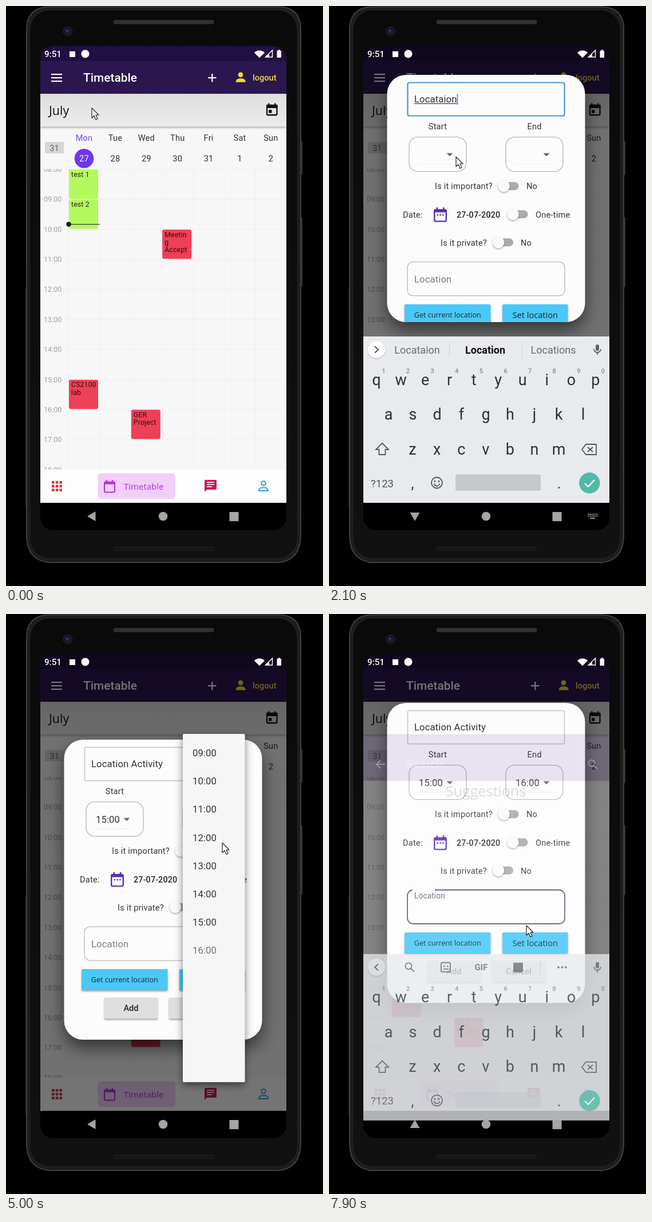
These frames come from a looping animation (554 by 1011 pixels, 8 s). An HTML page with a canvas:

```html
<!DOCTYPE html>
<html lang="en">
<head>
<meta charset="utf-8">
<title>Timetable</title>
<style>
html, body { margin: 0; width: 100%; height: 100%; overflow: hidden; background: #000; }
canvas { display: block; }
</style>
</head>
<body>
<canvas id="stage" width="554" height="1011"></canvas>
<script>
const ctx = document.getElementById('stage').getContext('2d');
const LOOP = 8000, STEP = 100, HOUR = 52.35, DAY = 54.4, ROW = 49.2;
const ROBOTO = 'Roboto, sans-serif', OPEN = '"Open Sans", sans-serif';

// Keyframes: [time, value, ...]
const CURSOR = [[0,150,178],[100,190,166],[300,345,128],[600,352,126],[800,346,150],[1000,272,252],
  [1800,270,254],[2100,222,263],[3500,212,261],[3900,205,275],[4300,178,582],[4500,178,587],
  [4700,372,356],[4800,376,362],[5000,378,399],[5400,352,580],[5700,350,584],[6100,347,552],
  [6500,272,476],[7200,274,478],[7500,345,543]];
const BOARD = [[1000,0],[1100,.4],[1200,.85],[1300,.96],[1400,1],[3500,1],[3600,.7],[3700,0],
  [5900,0],[6000,.6],[6100,.96],[6200,1],[7800,1],[7900,.76]];
const VIEW = [[1000,866],[1200,576],[3500,576],[3600,738],[3700,866],[5900,866],[6000,660],
  [6100,576],[7800,576],[7900,738]];
const FLOAT = [[6600,0],[6700,.6],[6800,1],[7800,1],[7900,.65]];

const clamp = v => Math.max(0, Math.min(1, v));
const ease = v => v * v * (3 - 2 * v);

function track(keys, t, i = 1) {
  if (t <= keys[0][0]) return keys[0][i];
  for (let n = 1; n < keys.length; n++) {
    const a = keys[n - 1], b = keys[n];
    if (t < b[0]) return a[i] + (b[i] - a[i]) * (t - a[0]) / (b[0] - a[0]);
  }
  return keys[keys.length - 1][i];
}

function text(s, x, y, size, color, { align = 'left', weight = 400, font = ROBOTO, space = 0 } = {}) {
  ctx.font = `${weight} ${size}px ${font}`;
  ctx.letterSpacing = space + 'px';
  ctx.textAlign = align;
  ctx.fillStyle = color;
  ctx.fillText(s, x, y + size * .355);
}
function rect(x, y, w, h, color) {
  ctx.fillStyle = color;
  ctx.fillRect(x, y, w, h);
}
function box(x, y, w, h, r, fill, stroke, line = 1) {
  ctx.beginPath();
  ctx.roundRect(x, y, w, h, r);
  if (fill) { ctx.fillStyle = fill; ctx.fill(); }
  if (stroke) { ctx.strokeStyle = stroke; ctx.lineWidth = line; ctx.stroke(); }
}
function disc(x, y, r, fill, stroke, line = 1) {
  ctx.beginPath();
  ctx.arc(x, y, r, 0, 7);
  if (fill) { ctx.fillStyle = fill; ctx.fill(); }
  if (stroke) { ctx.strokeStyle = stroke; ctx.lineWidth = line; ctx.stroke(); }
}
function poly(pts, fill, stroke, line = 2, open = false) {
  ctx.beginPath();
  pts.forEach(([x, y]) => ctx.lineTo(x, y));
  if (!open) ctx.closePath();
  if (fill) { ctx.fillStyle = fill; ctx.fill(); }
  if (stroke) { ctx.strokeStyle = stroke; ctx.lineWidth = line; ctx.stroke(); }
}
function shadowed(blur, dy, alpha, draw) {
  ctx.save();
  ctx.shadowColor = `rgba(0,0,0,${alpha})`;
  ctx.shadowBlur = blur;
  ctx.shadowOffsetY = dy;
  draw();
  ctx.restore();
}
function vertical(y0, y1, c0, c1) {
  const g = ctx.createLinearGradient(0, y0, 0, y1);
  g.addColorStop(0, c0);
  g.addColorStop(1, c1);
  return g;
}
function clipBox(x, y, w, h, r) {
  ctx.beginPath();
  ctx.roundRect(x, y, w, h, r);
  ctx.clip();
}

function calendarIcon(x, y, color, s = 1) {
  box(x - 9.5 * s, y - 8 * s, 19 * s, 18.5 * s, 2, null, color, 2.2 * s);
  rect(x - 9.5 * s, y - 9 * s, 19 * s, 5 * s, color);
  rect(x - 6.5 * s, y - 12 * s, 2.4 * s, 4 * s, color);
  rect(x + 4.1 * s, y - 12 * s, 2.4 * s, 4 * s, color);
}
function magnifier(x, y, color) {
  disc(x - 2, y - 2, 5.5, null, color, 2);
  poly([[x + 2, y + 2], [x + 8, y + 8]], null, color, 2.2, true);
}

function phone() {
  rect(0, 0, 554, 1011, '#000');
  box(514, 235, 4, 60, 2, '#333');
  box(514, 368, 4, 122, 2, '#333');
  rect(34, 490, 2, 385, '#222');
  const shell = new Path2D('M72 1.5 H480 Q515 4 515 40 V926 Q513 967 476 970 H76 Q38 967 36 926 V40 Q37 4 72 1.5Z');
  ctx.fillStyle = '#1d1d1d';
  ctx.fill(shell);
  ctx.strokeStyle = '#3f3f3f';
  ctx.lineWidth = 2;
  ctx.stroke(shell);
  box(41.5, 6.5, 468, 957, 35, vertical(0, 965, '#0a0a0a', '#111'), '#232323', 1.5);
  box(188, 25, 175, 6, 3, '#303030', '#3b3b3b');
  box(188, 943, 175, 6, 3, '#161616', '#222');
  disc(108, 44, 8, '#17171f', '#25252d');
  disc(108, 44, 4, '#1d1d42');
  disc(106.5, 43, 1.6, '#49498a');
  box(60, 70, 430, 844, 22, '#000');
}

function appBar() {
  rect(60, 70, 430, 26, '#201041');
  rect(60, 96, 430, 57, '#2b1650');
  for (const y of [119, 125, 131]) rect(79, y - 1, 19, 2.2, '#fff');
  text('Timetable', 135, 125, 20.9, '#fff', { weight: 500 });
  rect(353, 124, 14.5, 2.2, '#fff');
  rect(359.2, 118, 2.2, 14.5, '#fff');
  disc(410, 119.8, 4.4, '#f2da35');
  box(401.5, 126.2, 17.5, 6.6, [7, 7, 0, 0], '#f2da35');
  text('logout', 431, 125, 14.6, '#f2da35', { weight: 500 });
}

function eventCard(day, hour, lines, color) {
  const x = 110 + day * DAY, y = 285 + (hour - 8) * HOUR;
  box(x, y, 51, 51, 3, color);
  lines.forEach((s, i) => text(s, x + 4, y + 8.6 + i * 13.3, 12.2, 'rgba(20,0,0,.86)', { space: .2 }));
}

function agenda() {
  rect(60, 153, 430, 655, '#f7f7f7');
  shadowed(4, 2, .3, () => rect(60, 153, 430, 57, vertical(153, 210, '#dedede', '#ececec')));
  text('July', 75, 182, 21.5, '#111', { font: OPEN });
  box(456, 173, 17.5, 17, 2, null, '#111', 2.3);
  rect(455, 172, 19.5, 6, '#111');
  rect(458, 169.5, 2.5, 4, '#111');
  rect(469, 169.5, 2.5, 4, '#111');
  rect(459, 181, 5.5, 5.5, '#111');

  box(68, 237, 33, 20, 1, '#d6d6d6');
  text('31', 84.5, 247.5, 14.6, '#666', { align: 'center' });
  disc(136.5, 265.7, 16.8, '#6d37f0');
  ['Mon', 'Tue', 'Wed', 'Thu', 'Fri', 'Sat', 'Sun'].forEach((d, i) => {
    const x = 136.5 + DAY * i;
    text(d, x, 229.5, 14.6, i ? '#333' : '#7c48e4', { align: 'center', space: .2 });
    text(String(i < 5 ? 27 + i : i - 4), x, 266, 14.6, i ? '#333' : '#fff', { align: 'center', space: .2 });
  });

  ctx.save();
  clipBox(60, 284, 430, 524, 0);
  for (let i = 0; i < 7; i++) rect(109 + i * DAY, 284, 1, 524, '#efefef');
  for (let h = 8; h < 19; h++) {
    const y = 284.3 + (h - 8) * HOUR;
    rect(103, y, 378, 1, '#eeeeee');
    text(String(h).padStart(2, '0') + ':00', 66, y + .3, 12.6, '#a2a2a2');
  }
  eventCard(0, 8, ['test 1'], '#b3fb5c');
  eventCard(0, 9, ['test 2'], '#b3fb5c');
  eventCard(3, 10, ['Meetin', 'g', 'Accept'], '#ee4056');
  eventCard(0, 15, ['CS2100', 'lab'], '#ee4056');
  eventCard(2, 16, ['GER', 'Project'], '#ee4056');
  rect(110, 380, 54, 1, '#222');
  disc(109.5, 380.5, 4.2, '#111');
  ctx.restore();
}

function tabs() {
  rect(60, 808, 430, 58, '#fdfdfd');
  for (let i = 0; i < 9; i++) rect(80 + (i % 3) * 6.7, 828 + (i / 3 | 0) * 6.7, 4.6, 4.6, '#dd3340');
  box(160.5, 814.5, 135.5, 44.5, 6, '#f2cffa');
  calendarIcon(181, 837.5, '#b530df', .95);
  text('Timetable', 206, 837.5, 15, '#b530df', { font: OPEN });
  box(347, 826, 21, 17, 2, '#c51d52');
  poly([[347, 840], [347, 847], [352, 842]], '#c51d52');
  for (const y of [829.5, 833.2, 837]) rect(351, y, y > 836 ? 9 : 13, 1.6, '#fff');
  disc(450, 832, 3.8, null, '#3b9edb', 2);
  box(442, 839.5, 16, 5.5, [6, 6, 0, 0], null, '#3b9edb', 2);
}

function ripple(t) {
  const k = clamp((t - 300) / 300), a = .11 * (1 - clamp((t - 600) / 300));
  if (t > 300 && a > 0) disc(360, 125, 36 * k, `rgba(255,255,255,${a})`);
}

function toggle(x, y) {
  box(x, y - 7, 27, 14, 7, '#aaa');
  shadowed(3, 1.5, .35, () => disc(x + 1, y, 10.3, '#fafafa'));
}
function picker(x, label, value) {
  text(label, x + 50, 309, 14.6, '#333', { align: 'center', space: .2 });
  box(x, 327.5, 100, 60, 15, null, '#a9a9a9', 1.1);
  rect(x + 17, 374, 65, 1, '#eee');
  text(value, x + 17, 358, 16.7, '#333', { space: .1 });
  poly([[x + 65.5, 355.5], [x + 76.5, 355.5], [x + 71, 361]], '#666');
}
function button(x, y, w, h, label, fill, size, style) {
  shadowed(3, 2, .35, () => box(x, y, w, h, 2, fill));
  text(label, x + w / 2, y + h / 2, size, '#1b2530', { align: 'center', ...style });
}

function titleAt(t) {
  if (t < 2300) return 'Locataion'.slice(0, Math.max(0, Math.floor((t - 1300) / 85)));
  return 'Location ' + 'Activity'.slice(0, Math.max(0, Math.floor((t - 2400) / 100)));
}
const titleFocused = t => (t >= 1000 && t < 3500) || (t >= 5900 && t < 6600);

function titleField(t) {
  const focus = titleFocused(t), s = titleAt(t);
  box(137.5, 232.5, 274, 58, 3, null, focus ? '#4a94df' : '#c3c3c3', focus ? 2.2 : 1.5);
  text(s || 'What activity is it?', 149, 261, 16.7, s ? '#333' : '#7d7d7d', { space: .1 });
  if (!focus) return;
  const end = 149 + (s ? ctx.measureText(s).width : 0);
  const word = s.lastIndexOf(' ') + 1;
  const from = 149 + ctx.measureText(s.slice(0, word)).width;
  if (s) rect(from, 268.5, end - from, 1.2, '#333');
  rect(end, 252, 1.8, 19, '#4a94df');
  if (t >= 6000) {
    disc(273, 286, 11.2, '#5ba8e8');
    poly([[273, 271.5], [265, 278.5], [281, 278.5]], '#5ba8e8');
  }
}

function locationField(t) {
  const k = track(FLOAT, t), size = 16.7 - 4.6 * k;
  box(137, 545, 275, 59, 10, null, k ? '#5a566f' : '#a9a9a9', k ? 1.8 : 1.1);
  if (k) rect(146, 543, 46 * Math.min(1, k * 1.3), 4, '#fcfcfc');
  text('Location', 149, 575 - 30 * k, size, k ? '#635f78' : '#7d7d7d', { space: .1 });
}

function dialog(t) {
  const view = track(VIEW, t), h = Math.min(523, view - 145), top = (95 + view - h) / 2;
  const plain = { space: .2 };
  ctx.save();
  ctx.globalAlpha = clamp((t - 400) / 200);
  shadowed(30, 14, .55, () => box(101.5, top, 346, h, 33, '#fcfcfc'));
  clipBox(101.5, top, 346, h, 33);
  ctx.translate(0, top - 219);
  titleField(t);
  picker(140, 'Start', t >= 4600 ? '15:00' : '');
  picker(309, 'End', t >= 5700 ? '16:00' : '');
  text('Is it important?', 185, 413, 14.6, '#333', plain);
  toggle(304.5, 413);
  text('No', 345, 413, 14.6, '#333', plain);
  text('Date:', 129, 462.5, 14.6, '#333', plain);
  calendarIcon(194.5, 463, '#5b2eb2', 1.08);
  for (let i = 0; i < 3; i++) rect(188.5 + i * 4.8, 462, 2.5, 2.5, '#5b2eb2');
  text('27-07-2020', 223, 462.5, 14.3, '#222', { weight: 500, space: .2 });
  toggle(320.5, 462);
  text('One-time', 361, 462.5, 14.6, '#333', plain);
  text('Is it private?', 195, 511.5, 14.6, '#333', plain);
  toggle(295, 511);
  text('No', 335, 511.5, 14.6, '#333', plain);
  locationField(t);
  button(132, 619, 150.5, 37, 'Get current location', '#4ac8f9', 12.6, { font: OPEN });
  button(303, 619, 114.5, 37, 'Set location', '#4ac8f9', 14.6, { font: OPEN });
  button(172, 668.5, 93, 37, 'Add', '#dfdfe0', 14.6, { weight: 500 });
  button(285, 668.5, 93, 37, 'Cancel', '#dfdfe0', 14.6, { weight: 500 });
  ctx.restore();
}

// Fade, then unfold, then the rows appear one after another.
function menu(t, x, first, open, close, hover) {
  const p = clamp((t - open) / 300);
  if (p <= 0 || t >= close + 100) return;
  const h = ROW + (607 - ROW) * ease(clamp((p - .25) * 4));
  const unit = .5 / 13.5;
  ctx.save();
  ctx.globalAlpha = clamp(p * 4) * (t >= close ? .4 : 1);
  const shade = ctx.globalAlpha;
  shadowed(14, 5, .5, () => box(x, 209, 108.5, h, 2, '#f6f6f6'));
  clipBox(x, 209, 108.5, h, 2);
  if (hover && t >= 4300) rect(x, 562, 108.5, ROW, '#ececec');
  for (let i = 0; i < 12; i++) {
    ctx.globalAlpha = shade * clamp((p - .5 - (i + 1) * unit) / (1.5 * unit));
    text(String(first + i).padStart(2, '0') + ':00', x + 17, 242 + i * ROW, 16.7, '#333', { space: .1 });
  }
  ctx.restore();
}

function searchPage(t) {
  if (t < 7900) return;
  ctx.save();
  clipBox(60, 70, 430, 796, 0);
  ctx.globalAlpha = .13;
  rect(60, 209.5, 430, 81.5, '#6831a4');
  rect(60, 291, 430, 575, '#fff');
  ctx.globalAlpha = .32;
  text('Search', 135, 262, 20.9, '#fff', { weight: 500 });
  poly([[98, 262], [83, 262], [90, 255], [83, 262], [90, 269]], null, '#fff', 2, true);
  magnifier(461, 262, '#fff');
  ctx.globalAlpha = .15;
  text('Suggestions', 274, 309, 25, '#222', { align: 'center', font: OPEN });
  ctx.restore();
}

function suggestions(t) {
  const s = titleAt(t), grey = '#686e74', mid = { align: 'center' };
  const tools = t >= 6700 || !s;
  shadowed(2, 1, .25, () => disc(83, 599, 15, tools ? '#eceef0' : '#fff'));
  const d = tools ? -3 : 3;
  poly([[83 - d, 593.5], [83 + d, 599], [83 - d, 604.5]], null, '#555', 2, true);
  box(466, 590, 6, 11, 3, '#5f656a');
  ctx.beginPath();
  ctx.arc(469, 598, 6, 0, Math.PI);
  ctx.strokeStyle = '#5f656a';
  ctx.lineWidth = 1.8;
  ctx.stroke();
  rect(468, 604, 2, 4, '#5f656a');
  if (tools) {
    magnifier(141, 599, grey);
    box(196, 591, 16, 16, 2, null, grey, 2);
    rect(200, 596, 2.4, 2.4, grey);
    rect(206, 596, 2.4, 2.4, grey);
    rect(200, 601, 8, 2, grey);
    text('GIF', 266, 599, 15, grey, { ...mid, weight: 700 });
    box(322, 591, 17, 17, 2, grey);
    rect(369, 587, 1, 24, '#c5c8cc');
    for (let i = -1; i < 2; i++) disc(407.5 + i * 6.5, 599, 2, grey);
    return;
  }
  rect(210, 586, 1, 26, '#ced1d5');
  rect(337, 586, 1, 26, '#ced1d5');
  const done = t >= 3300, word = s.split(' ').pop();
  const full = s.includes(' ') ? 'Activity' : 'Location';
  text(done ? 'Activity' : word, 154, 599.5, 18, grey, mid);
  if (done) text("Activity's", 273, 599.5, 18, grey, mid);
  else {
    text(full, 273, 599.5, 18, '#111', { ...mid, weight: 700 });
    text(full === 'Activity' ? 'Activities' : 'Locations', 392, 599.5, 18, grey, mid);
  }
}

function keyboard(t) {
  const k = track(BOARD, t);
  if (k <= 0) return;
  const off = 70 * (1 - k), ink = '#27343b', mid = { align: 'center' };
  if (k < 1 && track(VIEW, t) === 576) rect(60, 576, 430, off + 1, '#1c0b3c');
  ctx.save();
  ctx.globalAlpha = k;
  ctx.translate(0, off);
  rect(60, 576, 430, 290, '#e8eaee');
  suggestions(t);
  [...'qwertyuiop'].forEach((c, i) => {
    text(c, 83 + i * 42.55, 651, 27, ink, mid);
    text(String((i + 1) % 10), 95.5 + i * 42.6, 636.5, 11, '#6b7176', mid);
  });
  [...'asdfghjkl'].forEach((c, i) => text(c, 104 + i * 42.5, 711.5, 27, ink, mid));
  [...'zxcvbnm'].forEach((c, i) => text(c, 146 + i * 42.6, 772, 27, ink, mid));
  poly([[93, 762], [104, 773], [98.5, 773], [98.5, 782], [87.5, 782], [87.5, 773], [82, 773]], null, '#50585e', 1.8);
  poly([[442, 773], [449, 764], [467, 764], [467, 782], [449, 782]], null, '#50585e', 1.8);
  poly([[452, 769], [461, 777]], null, '#50585e', 1.8, true);
  poly([[461, 769], [452, 777]], null, '#50585e', 1.8, true);
  text('?123', 93, 832, 18.5, '#50585e', mid);
  text(',', 146, 832, 25, ink, mid);
  disc(188.5, 831, 9.5, null, '#50585e', 1.8);
  disc(185, 828.5, 1.5, '#50585e');
  disc(192, 828.5, 1.5, '#50585e');
  ctx.beginPath();
  ctx.arc(188.5, 831.5, 5, .2, 2.94);
  ctx.stroke();
  box(221, 816.5, 149, 28.5, 3, '#c5c9ce');
  text('.', 402, 832, 25, ink, mid);
  disc(455.3, 831.5, 18.2, '#52b9a7');
  poly([[447, 832], [453, 838], [464, 826]], null, '#fff', 2.2, true);
  ctx.restore();
}

function system(t) {
  text('9:51', 67, 84, 15.2, '#fff', { weight: 500 });
  rect(111, 79, 10, 10, '#fff');
  disc(138.5, 83.5, 7, '#fff');
  ctx.beginPath();
  ctx.moveTo(443, 90.5);
  ctx.arc(443, 90.5, 13, -2.35, -.79);
  ctx.fill();
  poly([[453.5, 89], [465.5, 89], [465.5, 77]], null, '#fff', 1.5);
  poly([[453.5, 89], [460, 89], [460, 82.5]], '#fff');
  box(473.5, 78, 7.5, 12, 1, '#fff');
  rect(475.5, 76.5, 3.5, 2, '#fff');

  const k = track(BOARD, t);
  ctx.save();
  ctx.translate(150, 889.5);
  if (k > 0) ctx.rotate(t >= 7900 ? Math.PI / 2 : -Math.PI / 2 * Math.min(1, k * 1.2));
  poly([[-8, 0], [6.5, -8.5], [6.5, 8.5]], '#a5a5a5');
  ctx.restore();
  disc(274.5, 889.5, 7.8, '#a5a5a5');
  rect(390.5, 882, 16, 16, '#a5a5a5');
  if (k > .8) {
    for (let r = 0; r < 2; r++)
      for (let i = 0; i < 6; i++) rect(452.5 + i * 3, 885 + r * 3.2, 1.9, 1.9, '#a5a5a5');
    rect(456, 891.8, 9, 1.8, '#a5a5a5');
  }
}

function pointer(t) {
  ctx.save();
  ctx.translate(track(CURSOR, t, 1), track(CURSOR, t, 2));
  ctx.lineJoin = 'round';
  poly([[0, 0], [0, 17], [4, 13.3], [7, 20], [10, 18.7], [7, 12.2], [12, 12]], '#fff', '#222', 1.2);
  ctx.restore();
}

function draw(t) {
  phone();
  ctx.save();
  clipBox(60, 70, 430, 844, 22);
  appBar();
  agenda();
  tabs();
  ripple(t);
  const shade = clamp((t - 400) / 200);
  if (shade) {
    rect(60, 70, 430, 796, `rgba(0,0,0,${.54 * shade})`);
    dialog(t);
  }
  menu(t, 139.5, 8, 3950, 4600, true);
  menu(t, 309, 9, 4750, 5700, false);
  searchPage(t);
  keyboard(t);
  system(t);
  ctx.restore();
  pointer(t);
}

const start = performance.now();
function frame() {
  const t = (performance.now() - start) % LOOP;
  draw(Math.floor(t / STEP) * STEP);
  requestAnimationFrame(frame);
}
frame();
</script>
</body>
</html>
```
